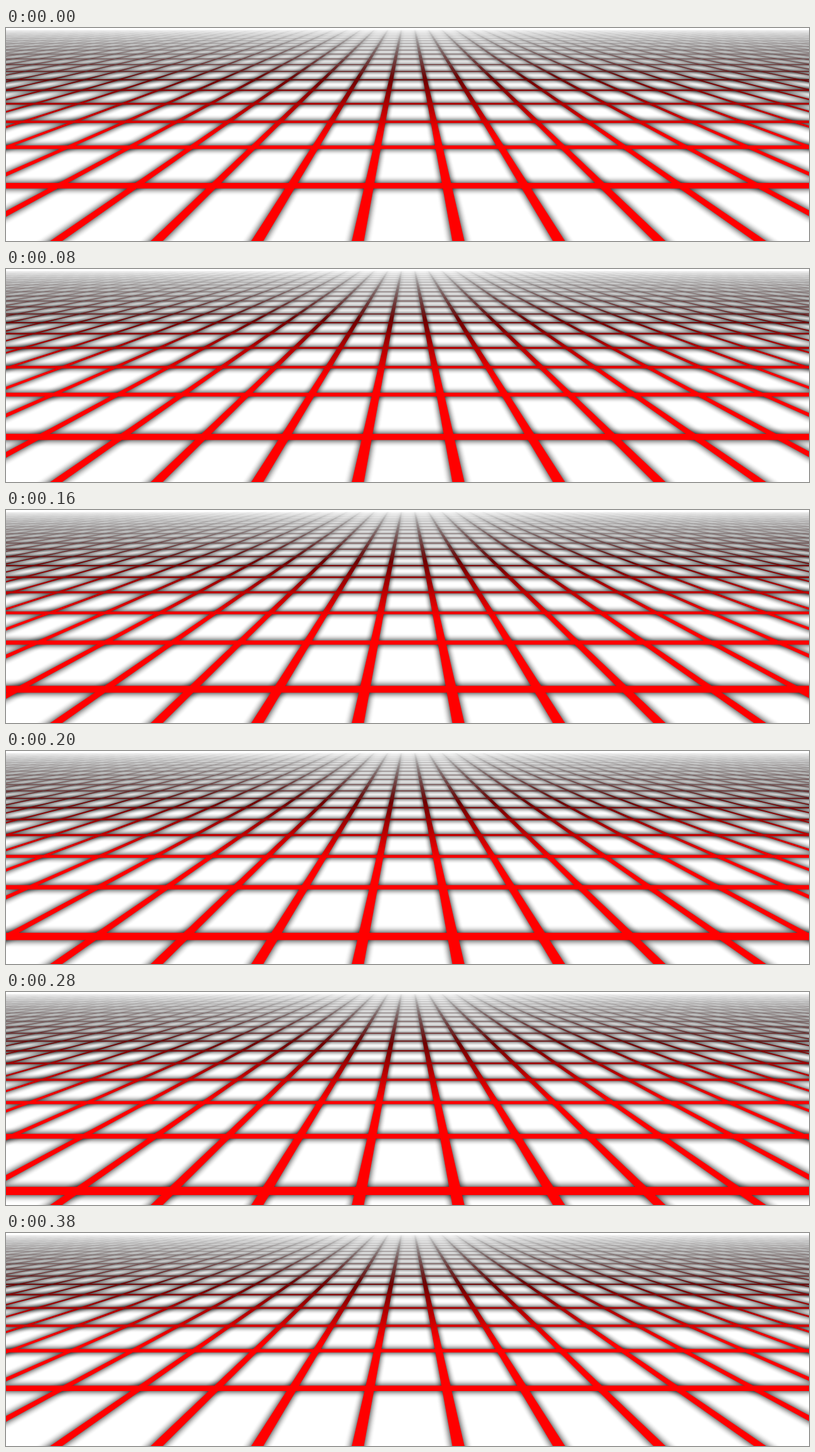
Animation, 1280 px wide and 341 px high, one loop 0.4 s. Source, as an HTML page with a canvas:

```html
<!DOCTYPE html>
<html>
<head>
<meta charset="utf-8">
<style>
html, body { margin: 0; height: 100%; overflow: hidden; background: #fff; }
canvas { display: block; }
</style>
</head>
<body>
<canvas id="stage" width="1280" height="341"></canvas>
<script>
const W = 1280, H = 341, TOP = 3;
const HORIZON = -50, DEPTH = 1179, CELL = 0.4105;
const LOOP = 400, STEP = 20;
const NEAREST = 3, START = 3.905;   // depths, in cells
const ctx = document.getElementById('stage').getContext('2d');
const image = ctx.createImageData(W, H);
const px = image.data.fill(255);

const clamp = v => Math.max(0, Math.min(1, v));
// Antialiased coverage of a line, d from its centre
const cover = (d, half) => clamp(Math.min(2 * half, half - d + 0.5));
// Soft shadow beyond the edge of a line
const shade = (d, half, reach) => 0.5 * clamp(1 - Math.max(0, d - half) / reach) ** 2;
const shadowReach = Y => 6 + 0.02 * Y;

// The lines running to the horizon never move, so compute them once
const railCover = new Float32Array(W * H);
const railLight = new Float32Array(W * H);
for (let y = TOP; y < H; y++) {
  const Y = y - HORIZON, cell = CELL * Y;
  for (let x = 0; x < W; x++) {
    const dx = x - 640.5;
    const scale = cell * Y / Math.hypot(Y, dx);
    const u = dx / cell - 0.5;
    const d = Math.abs(u - Math.round(u)) * scale;
    const half = 0.06 * scale;
    railCover[y * W + x] = cover(d, half);
    railLight[y * W + x] = 1 - shade(d, half, shadowReach(Y));
  }
}

function draw(t) {
  const offset = START - t / LOOP;
  const first = Math.ceil(NEAREST - offset);
  for (let y = TOP; y < H; y++) {
    const Y = y - HORIZON, scale = Y * Y / DEPTH;
    const u = DEPTH / Y - offset;
    const d = Math.abs(u - Math.max(first, Math.round(u))) * scale;
    const half = 0.0575 * scale;
    const rowCover = cover(d, half);
    const rowLight = 1 - shade(d, half, shadowReach(Y));
    const red = clamp((y - 10) / 165);
    const fade = clamp((y - 2) / 80) ** 0.6;
    for (let x = 0, i = y * W; x < W; x++, i++) {
      const c = Math.max(rowCover, railCover[i]);
      const ground = (1 - c) * rowLight * railLight[i];
      px[i * 4] = 255 * (1 - fade + fade * (ground + c * red));
      px[i * 4 + 1] = px[i * 4 + 2] = 255 * (1 - fade + fade * ground);
    }
  }
  ctx.putImageData(image, 0, 0);
}

let shown = -1;
function tick() {
  const t = Math.floor(performance.now() % LOOP / STEP) * STEP;
  if (t !== shown) draw(shown = t);
  requestAnimationFrame(tick);
}
tick();
</script>
</body>
</html>
```
